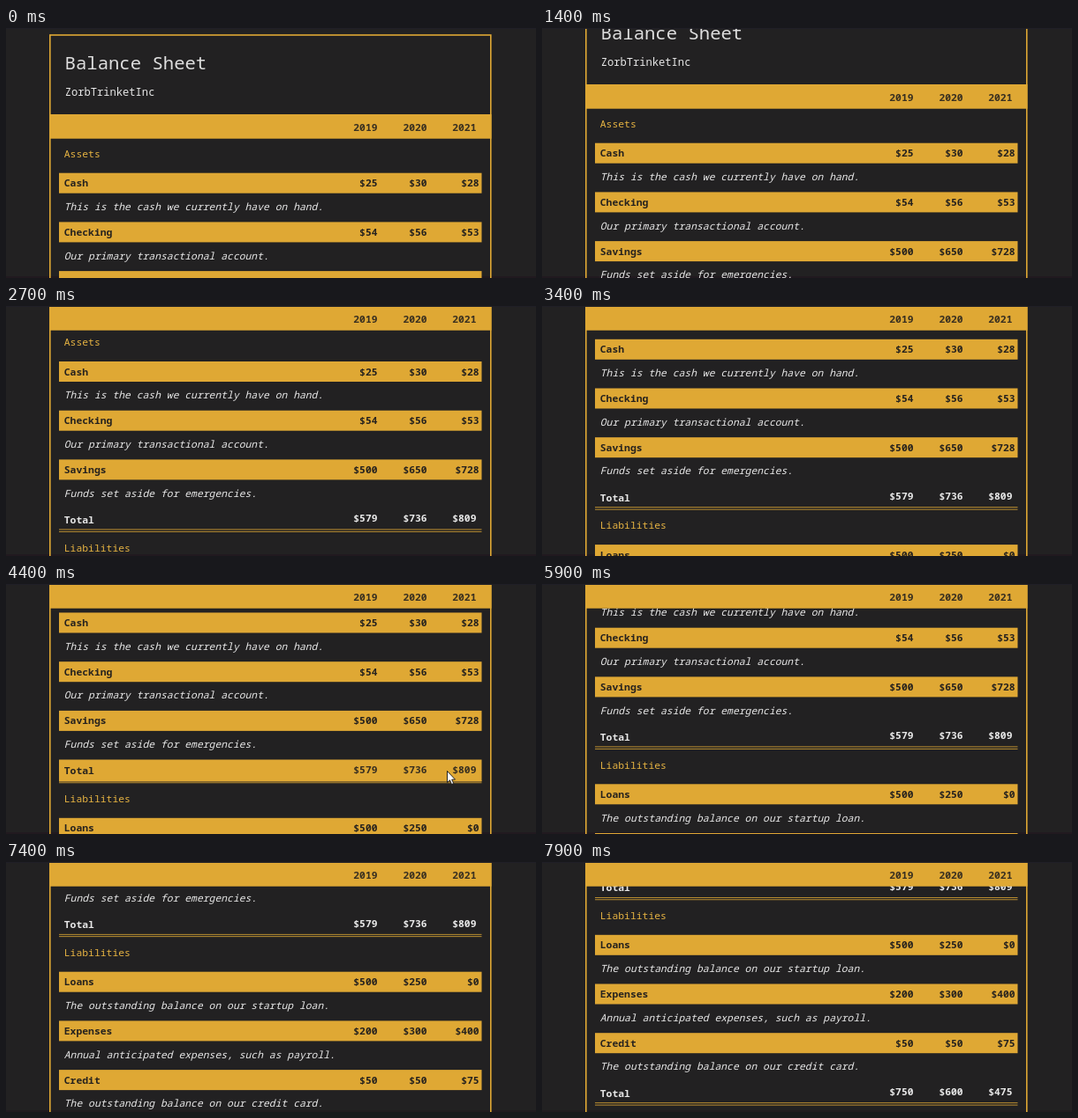
These frames come from a looping animation (600x284 px, 8 s). An HTML page:

```html
<!DOCTYPE html>
<html lang="en">
<head>
<meta charset="utf-8">
<title>Balance Sheet</title>
<style>
  html, body { margin: 0; width: 100%; height: 100%; overflow: hidden; background: #222122; }
  svg { display: block; width: 600px; height: 284px; }
  text { font: 500 11.38px "Noto Sans Mono", "DejaVu Sans Mono", monospace; fill: #e8e8e8; white-space: pre; }
  .title { font-size: 20.6px; font-weight: 400; fill: #dedede; }
  .company { font-size: 12.1px; }
  .section { fill: #e6b342; }
  .note { font-style: italic; }
  .bold { font-weight: 700; }
  .dark { font-weight: 700; fill: #26221e; }
  .year { font-weight: 600; fill: #382f20; }
  .end { text-anchor: end; }
  .gold { fill: #dfa834; }
</style>
</head>
<body>
<svg viewBox="0 0 600 284">
  <rect y="282" width="600" height="2" fill="#21191f"/>
  <g id="page">
    <rect x="49.8" y="8" width="499" height="900" fill="none" stroke="#dfa834" stroke-width="1.6"/>
    <text class="title" x="66.6" y="47">Balance Sheet</text>
    <text class="company" x="66.8" y="77">ZorbTrinketInc</text>
  </g>
  <g id="header">
    <rect class="gold" x="49" y="98" width="500.5" height="27.7"/>
  </g>
  <rect width="600" height="1" fill="#201f26"/>
  <path id="cursor" d="M0 0V13L3 10.3L5 15L7.2 14L5.2 9.6H9Z" fill="#fff" stroke="#111" stroke-width=".9"/>
</svg>
<script>
const NS = "http://www.w3.org/2000/svg";
const byId = id => document.getElementById(id);
const [page, header, cursor] = ["page", "header", "cursor"].map(byId);

function add(parent, tag, attrs, content = "") {
  const node = document.createElementNS(NS, tag);
  for (const key in attrs) node.setAttribute(key, attrs[key]);
  node.textContent = content;
  parent.append(node);
  return node;
}
const label = (parent, cls, y, content) => add(parent, "text", { class: cls, x: 65.8, y }, content);
const bar = (parent, y, height) => add(parent, "rect", { class: "gold", x: 60, y, width: 478.5, height });
function values(parent, cls, y, list, lastX = 532.5) {
  list.forEach((v, i) =>
    add(parent, "text", { class: cls + " end", x: [420.6, 476.7, lastX][i], y }, v));
}

const sections = [
  { name: "Assets", total: ["$579", "$736", "$809"], rows: [
    ["Cash", "This is the cash we currently have on hand.", "$25", "$30", "$28"],
    ["Checking", "Our primary transactional account.", "$54", "$56", "$53"],
    ["Savings", "Funds set aside for emergencies.", "$500", "$650", "$728"]] },
  { name: "Liabilities", total: ["$750", "$600", "$475"], rows: [
    ["Loans", "The outstanding balance on our startup loan.", "$500", "$250", "$0"],
    ["Expenses", "Annual anticipated expenses, such as payroll.", "$200", "$300", "$400"],
    ["Credit", "The outstanding balance on our credit card.", "$50", "$50", "$75"]] }
];

sections.forEach(({ name, rows, total }, s) => {
  const top = s * 233.3;
  label(page, "section", top + 147, name);
  rows.forEach(([title, note, ...sums], r) => {
    const y = top + r * 55.7;
    bar(page, y + 164.7, 23);
    label(page, "dark", y + 180.3, title);
    values(page, "dark", y + 180.3, sums, 535.7);
    label(page, "note", y + 207, note);
  });
  label(page, "bold", top + 348.7, "Total");
  values(page, "bold", top + 347.1, total);
  bar(page, top + 355.2, 0.8);
  bar(page, top + 357.6, 0.8);
});
values(header, "year", 117, ["2019", "2020", "2021"]);

const hover = add(page, "g", {});
bar(hover, 331.7, 25);
label(hover, "dark", 348.7, "Total");
values(hover, "year", 347.1, sections[0].total);

const STEP = 100, LOOP = 8000;
const scrollKeys = [[0, 0], [500, 2], [600, 2], [1400, 34], [2700, 101.7], [3900, 132.2, true],
  [5600, 132.2], [5900, 170.7], [6900, 231.4], [7900, 315.2]];
const cursorKeys = [[3400, 604], [4000, 499.5, true], [4800, 499.5], [5100, 604]];
const hoverKeys = [[4000, 0], [4400, 1], [4800, 1], [5200, 0]];

// Keys are [time, value, easeOut]; values hold outside the range.
function track(keys, t) {
  const i = keys.findIndex(k => k[0] > t);
  if (i === 0) return keys[0][1];
  if (i < 0) return keys[keys.length - 1][1];
  const [t0, v0] = keys[i - 1], [t1, v1, easeOut] = keys[i];
  const u = (t - t0) / (t1 - t0);
  return v0 + (v1 - v0) * (easeOut ? 1 - (1 - u) ** 2 : u);
}

function draw(now) {
  const t = Math.floor(now % LOOP / STEP) * STEP;
  const scroll = track(scrollKeys, t);
  page.setAttribute("transform", `translate(0 ${-scroll})`);
  header.setAttribute("transform", `translate(0 ${-Math.min(scroll, 98)})`);
  hover.setAttribute("opacity", track(hoverKeys, t));
  cursor.setAttribute("transform", `translate(${track(cursorKeys, t)} 212.5)`);
}

const start = performance.now();
function tick() {
  draw(performance.now() - start);
  requestAnimationFrame(tick);
}
tick();
</script>
</body>
</html>
```
